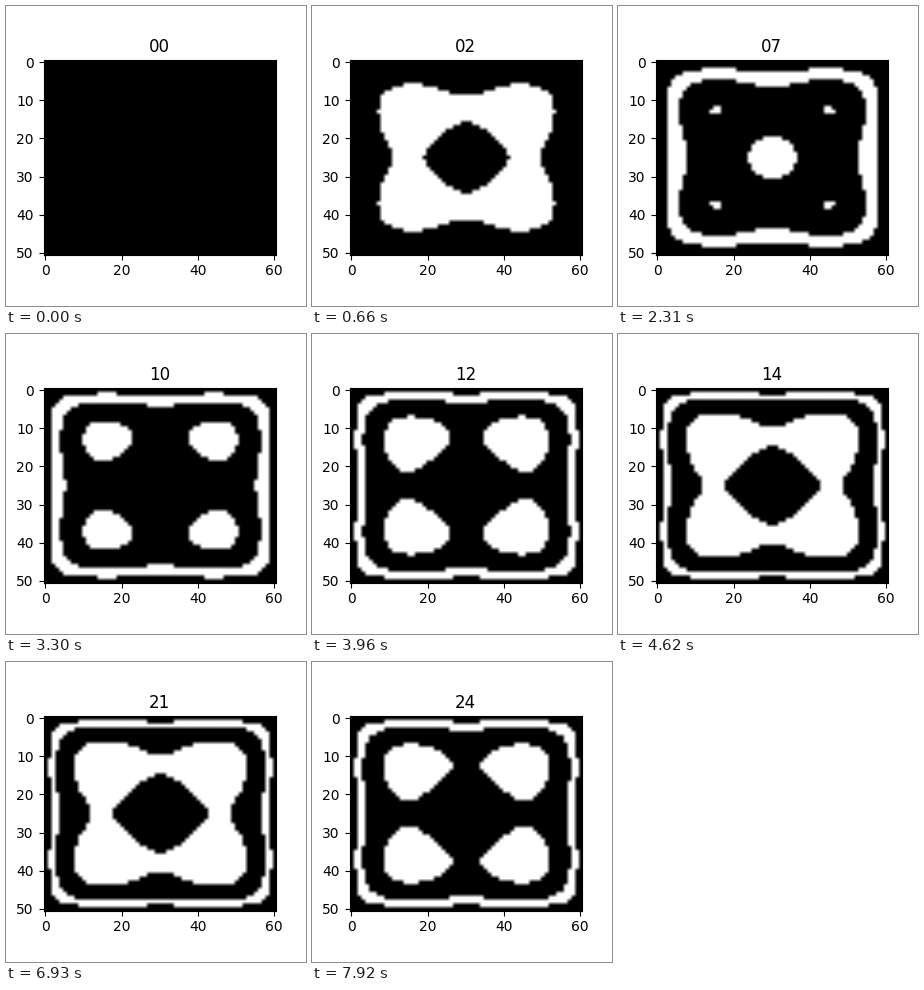
A matplotlib script that plays this animation: 300x300 px, repeating every 8 s.

```python
import numpy as np
import matplotlib.pyplot as plt
from matplotlib.animation import FuncAnimation

STEP_MS = 330
TICK_MS = 40
LOOP_MS = 8000
COLS, ROWS = 61, 51
PEAK_STEP = 16.5
FALL_SPEED = 0.57

# Each contour starts at the four humps and sinks exponentially to a limit:
# start step, rate per step, limit of the exponent
CONTOURS = [(0.2, 0.21, 2.25), (2.2, 0.117, 1.29), (6.85, 0.0475, 0.36)]


def harmonics(count):
    """First and third sine mode along one side."""
    t = np.linspace(0, np.pi, count)
    return np.sin(t), np.sin(3 * t)


def make_surface():
    x1, x3 = harmonics(COLS)
    y1, y3 = harmonics(ROWS)
    mixed = np.outer(y1, x3) + np.outer(y3, x1)
    z = np.outer(y1, x1) + mixed / 3 + 0.085 * np.outer(y3, x3)
    return z / z.max()


SURFACE = make_surface()


def fringes(step):
    """Black and white bands: the surface cut by every contour level."""
    phase = step
    if step > PEAK_STEP:
        phase = PEAK_STEP - FALL_SPEED * (step - PEAK_STEP)
    bands = np.zeros((ROWS, COLS), bool)
    for start, rate, limit in CONTOURS:
        level = np.exp(-min(rate * (phase - start), limit))
        bands ^= SURFACE > level
    return bands.astype(float)


fig, ax = plt.subplots(figsize=(3, 3), dpi=100)
image = ax.imshow(fringes(0), cmap="gray", vmin=0, vmax=1,
                  interpolation="bilinear")
title = ax.set_title("00")


def update(i):
    step = (i * TICK_MS + TICK_MS - 1) // STEP_MS
    image.set_data(fringes(step))
    title.set_text(f"{step:02d}")
    return image, title


anim = FuncAnimation(fig, update, frames=LOOP_MS // TICK_MS,
                     interval=TICK_MS, repeat=True, repeat_delay=0)
plt.show()
```
